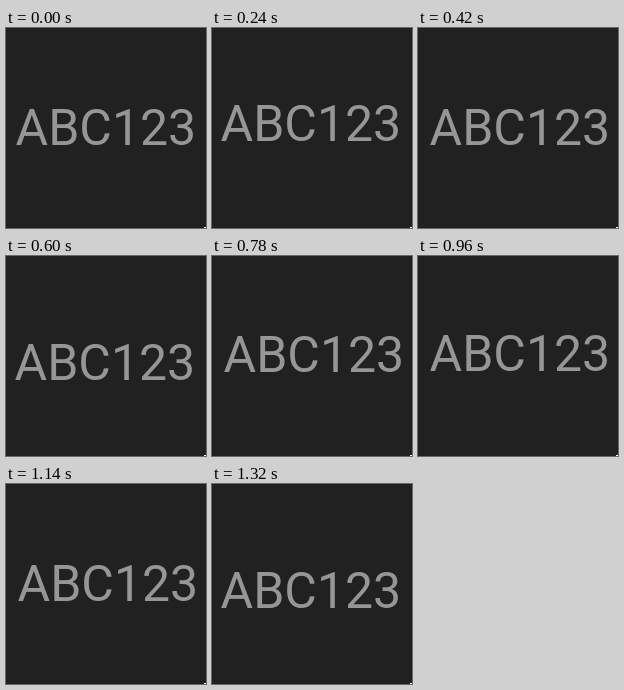
Recreate the animation shown at these times as an HTML page. Size 200x200 px, loop 1380 ms.

```html
<!DOCTYPE html>
<html lang="en">
<head>
<meta charset="utf-8">
<title>Shaking text</title>
<style>
  html, body {
    margin: 0;
    width: 100%;
    height: 100%;
    overflow: hidden;
    background: #212121;
  }
  svg {
    display: block;
    width: 200px;
    height: 200px;
  }
  text {
    font: 400 50px Roboto, sans-serif;
    fill: #969696;
    animation: shake 1380ms step-end infinite;
  }
  /* Held poses at 0, 240, 420, 600, 780, 960, 1140 and 1320 ms */
  @keyframes shake {
    0% { transform: translate(0, 0); }
    17.391% { transform: translate(-1px, -4px); }
    30.435% { transform: translate(2px, 0); }
    43.478% { transform: translate(-1px, 7px); }
    56.522% { transform: translate(2px, -1px); }
    69.565% { transform: translate(2px, -2px); }
    82.609% { transform: translate(2px, 0); }
    95.652%, 100% { transform: translate(-1px, 7px); }
  }
</style>
</head>
<body>
<svg viewBox="0 0 200 200">
  <rect width="200" height="200" fill="#212121"/>
  <rect x="198" y="199" width="2" height="1" fill="#fff"/>
  <text x="9.6" y="117">ABC123</text>
</svg>
</body>
</html>
```
